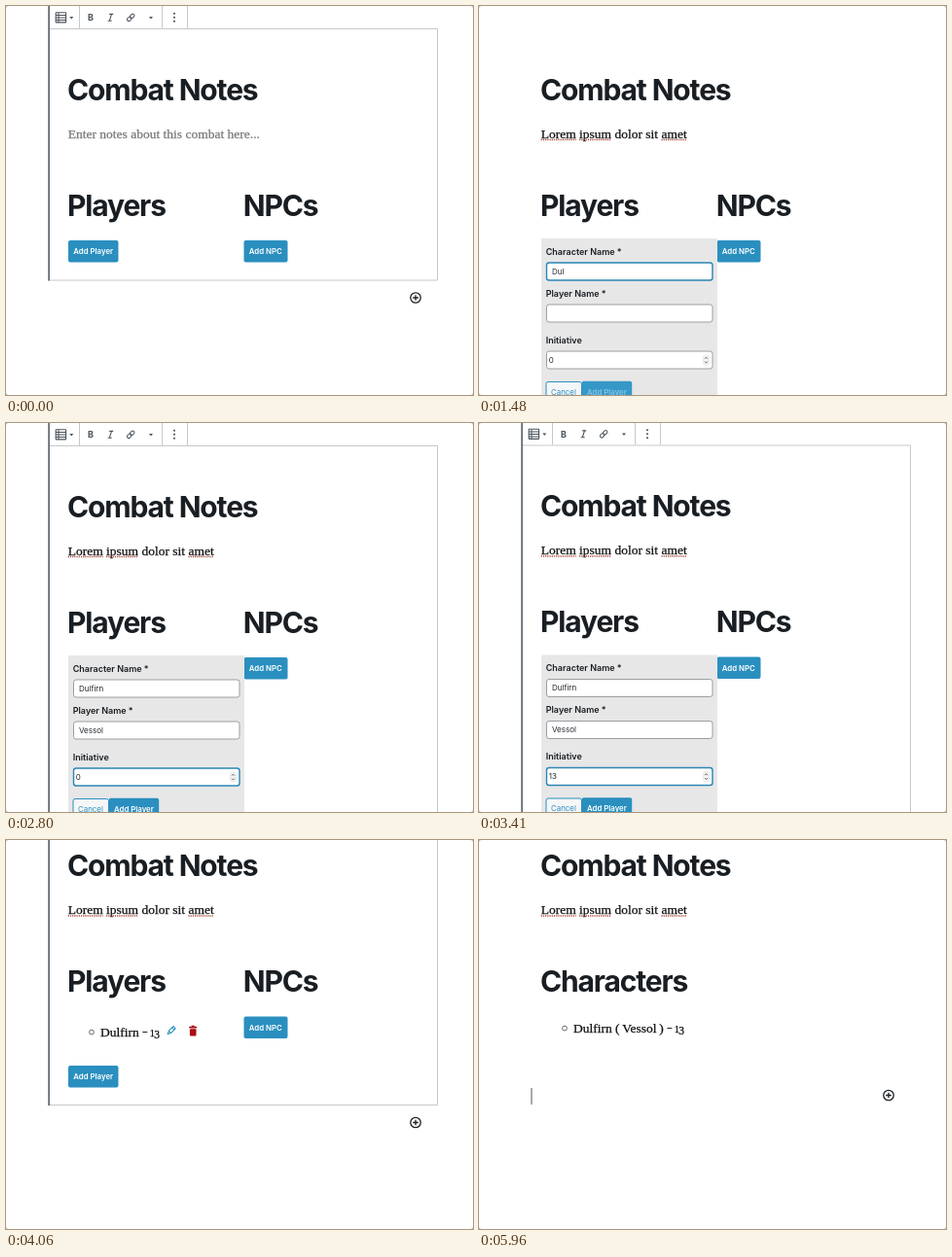
An HTML page with a canvas for the animation above (6.05 s loop, 480 by 400 pixels).

```html
<!DOCTYPE html>
<html lang="en">
<head>
<meta charset="utf-8">
<title>Combat notes block</title>
<style>
  html, body { margin: 0; width: 100%; height: 100%; overflow: hidden; background: #fff; }
  canvas { display: block; width: 480px; height: 400px; }
</style>
</head>
<body>
<canvas id="stage" width="480" height="400"></canvas>
<script>
const ctx = document.getElementById('stage').getContext('2d');
const LOOP = 6050;
const SANS = 'Inter, "Noto Sans", sans-serif';
const SERIF = '"Liberation Serif", "Noto Serif", serif';
const INK = '#191e23', BLUE = '#2a8fbf', DARK_BLUE = '#1e80b0', LINE = '#c6c8ca';
const NOTE = 'Lorem ipsum dolor sit amet';
const CHARACTER = 'Dulfirn', PLAYER = 'Vessol';
const MISSPELLED = ['Lorem', 'ipsum', 'amet'];

const between = (t, from, to) => t >= from && t < to;
const typed = (word, t, from, step) =>
  word.slice(0, Math.max(0, Math.floor((t - from) / step) + 1));

function text(str, x, y, font, color = INK, spacing = 0) {
  ctx.font = font;
  ctx.letterSpacing = spacing + 'px';
  ctx.fillStyle = color;
  ctx.fillText(str, x, y);
  return ctx.measureText(str).width;
}

const heading = (str, x, y) => text(str, x, y, `700 30px ${SANS}`, INK, -1.15);
const label = (str, y) => text(str, 68.7, y, `600 9px ${SANS}`);

// A hairline stroke gives the serif face its heavier book weight.
function serif(str, x, y, color = '#111', size = 13.5) {
  const width = text(str, x, y, `${size}px ${SERIF}`, color);
  ctx.strokeStyle = color;
  ctx.lineWidth = 0.25;
  ctx.strokeText(str, x, y);
  return width;
}

function box(x, y, w, h, r, fill, stroke, width = 1) {
  ctx.beginPath();
  ctx.roundRect(x, y, w, h, r);
  if (fill) { ctx.fillStyle = fill; ctx.fill(); }
  if (stroke) { ctx.strokeStyle = stroke; ctx.lineWidth = width; ctx.stroke(); }
}

function lines(color, width, ...paths) {
  ctx.strokeStyle = color;
  ctx.lineWidth = width;
  ctx.beginPath();
  for (const [x, y, ...rest] of paths) {
    ctx.moveTo(x, y);
    for (let i = 0; i < rest.length; i += 2) ctx.lineTo(rest[i], rest[i + 1]);
  }
  ctx.stroke();
}

function disc(x, y, r, fill, stroke, width = 1) {
  ctx.beginPath();
  ctx.arc(x, y, r, 0, Math.PI * 2);
  if (fill) { ctx.fillStyle = fill; ctx.fill(); }
  if (stroke) { ctx.strokeStyle = stroke; ctx.lineWidth = width; ctx.stroke(); }
}

function triangle(x, y, w, h, color) {
  ctx.fillStyle = color;
  ctx.beginPath();
  ctx.moveTo(x - w, y);
  ctx.lineTo(x + w, y);
  ctx.lineTo(x, y + h);
  ctx.fill();
}

function button(str, x, y, w, fill = BLUE, color = '#fff') {
  box(x, y, w, 22.5, 2, fill);
  text(str, x + 5.3, y + 14.2, `600 7.8px ${SANS}`, color);
}

function input(value, y, focused, x = 75) {
  box(69.5, y, 170.5, 18, 2.5, '#fff', focused ? '#2a86b4' : '#9a9ea3', focused ? 1.4 : 1);
  text(value, x, y + 11.9, `400 8px ${SANS}`, '#23282d');
}

function toolbar() {
  lines(LINE, 1, [75.5, 0, 75.5, 23], [160.5, 0, 160.5, 23], [186.5, 0, 186.5, 23]);
  const icon = '#4b535b';
  box(51.2, 6.7, 10.4, 10.2, 0.5, null, icon, 1.1);
  lines(icon, 1, [51, 9.5, 62, 9.5], [51, 12, 62, 12], [51, 14.5, 62, 14.5], [54, 7, 54, 17]);
  triangle(67.3, 11, 2, 2.4, icon);
  text('B', 84, 15.3, `700 9px ${SANS}`, icon);
  lines(icon, 1.1, [106.2, 8.4, 110.2, 8.4], [104.7, 15.2, 108.7, 15.2], [108.5, 8.4, 106.4, 15.2]);
  ctx.save();
  ctx.translate(128.2, 11.8);
  ctx.rotate(-Math.PI / 4);
  box(-4.6, -1.7, 5, 3.4, 1.7, null, icon, 1);
  box(-0.4, -1.7, 5, 3.4, 1.7, null, icon, 1);
  ctx.restore();
  triangle(149, 11, 2, 2.4, icon);
  for (const y of [7.7, 11.7, 15.7]) disc(173, y, 1.05, icon);
}

function frame(bottom) {
  lines(LINE, 1, [44, 23.5, 443.5, 23.5, 443.5, bottom, 44, bottom]);
  ctx.fillStyle = '#555d66';
  ctx.fillRect(43.3, 0, 1.6, bottom + 0.5);
  toolbar();
}

function inserter(y) {
  disc(421, y, 5.2, null, INK, 1.3);
  lines(INK, 1.3, [418.2, y, 423.8, y], [421, y - 2.8, 421, y + 2.8]);
}

function note(t) {
  const baseline = 135.5;
  if (t < 40) {
    serif('Enter notes about this combat here...', 63.7, baseline, '#777');
    return;
  }
  const shown = typed(NOTE, t, 16, 12.5);
  serif(shown, 63.7, baseline);
  for (const word of MISSPELLED) {
    const start = NOTE.indexOf(word), end = start + word.length;
    if (shown.length < end || (shown.length === end && t < 420)) continue;
    const x = 63.7 + ctx.measureText(NOTE.slice(0, start)).width;
    const w = ctx.measureText(word).width;
    ctx.setLineDash([1.2, 1]);
    lines('#a8473c', 1.4, [x, baseline + 2, x + w, baseline + 2]);
    ctx.setLineDash([]);
  }
}

function form(t) {
  const name = typed(CHARACTER, t, 1300, 75);
  const player = typed(PLAYER, t, 2120, 66);
  const initiative = t < 2900 ? '0' : t < 3020 ? '1' : '13';
  box(64, 239, 181, 173.5, 0, '#e7e7e7');
  label('Character Name *', 255.8);
  input(name, 264, between(t, 940, 1930));
  label('Player Name *', 298.8);
  input(player, 307, between(t, 1930, 2640));
  label('Initiative', 346.8);
  input(initiative, 355, t >= 2640, 71.8);
  box(230.5, 359, 6, 10, 2, '#f4f4f4', '#ddd', 0.6);
  lines('#555', 0.9, [232.1, 362.7, 233.5, 361.1, 234.9, 362.7], [232.1, 365.5, 233.5, 367.1, 234.9, 365.5]);
  box(69, 386.5, 36.5, 21.5, 2, '#f5f6f7', BLUE, 1);
  text('Cancel', 74, 399.9, `400 7.9px ${SANS}`, BLUE);
  if (!name || !player) button('Add Player', 105.7, 385.7, 51.5, '#3698c7', '#83c4e2');
  else button('Add Player', 105.7, 385.7, 51.5, t >= 3570 ? DARK_BLUE : BLUE);
}

// Ends with a short raised dash and old-style figures: the 3 drops below the baseline.
function listItem(str, y) {
  disc(88, y - 4.4, 2.4, null, '#444', 0.8);
  const x = 97 + serif(str, 97, y);
  lines('#222', 1, [x + 3.6, y - 4.5, x + 8.6, y - 4.5]);
  serif('1', x + 11, y, '#111', 10.5);
  serif('3', x + 15.6, y + 2, '#111', 11.5);
}

function pencil(x, y) {
  ctx.save();
  ctx.translate(x, y);
  ctx.rotate(Math.PI / 4);
  box(-1.6, -4.8, 3.2, 6.8, 0.6, null, BLUE, 1.1);
  lines(BLUE, 1, [-1.6, 2, 0, 5, 1.6, 2], [-1.6, -2.8, 1.6, -2.8]);
  ctx.restore();
}

function trash(x, y) {
  const red = '#a90d12';
  box(x - 4, y - 4.4, 8, 1.6, 0.4, red);
  box(x - 1.6, y - 5.4, 3.2, 1.2, 0.4, red);
  box(x - 3.3, y - 2, 6.6, 7.2, 1, red);
}

function editor(t) {
  const formOpen = between(t, 540, 3800), listed = t >= 3800;
  const typing = between(t, 40, 500) || between(t, 1290, 2560) || between(t, 2900, 3280);
  const bottom = formOpen ? 436 : listed ? 332 : 282;
  if (!typing) frame(bottom);
  heading('Players', 63, 215.5);
  heading('NPCs', 243.7, 215.5);
  button('Add NPC', 244.5, 241, 45);
  if (formOpen) form(t);
  else button('Add Player', 64, listed ? 291.5 : 241, 51.5);
  if (listed) {
    listItem(CHARACTER, 261.5);
    pencil(169.8, 255.5);
    trash(192.2, 255.7);
  }
  inserter(bottom + 18);
}

function preview(t) {
  heading('Characters', 63, 215.5);
  listItem(`${CHARACTER} (\u2009${PLAYER}\u2009)`, 257.5);
  if (!between(t, 5280, 5620)) lines('#555', 1, [54, 314.5, 54, 331.5]);
  inserter(322);
}

function scrollAt(t) {
  const p = Math.min(1, Math.max(0, (t - 3380) / 220));
  const eased = p < 0.5 ? 4 * p ** 3 : 1 - 4 * (1 - p) ** 3;
  return Math.round(119 * eased) / 2;
}

function draw(now) {
  const t = now % LOOP;
  ctx.fillStyle = '#bdbdbd';
  ctx.fillRect(0, 0, 480, 400);
  box(0, 0, 480, 400, 3, '#fff');
  ctx.save();
  ctx.translate(0, -scrollAt(t));
  heading('Combat Notes', 63, 96.5);
  note(t);
  if (t < 4960) editor(t);
  else preview(t);
  ctx.restore();
}

const start = performance.now();
function tick() {
  draw(performance.now() - start);
  requestAnimationFrame(tick);
}
tick();
</script>
</body>
</html>
```
